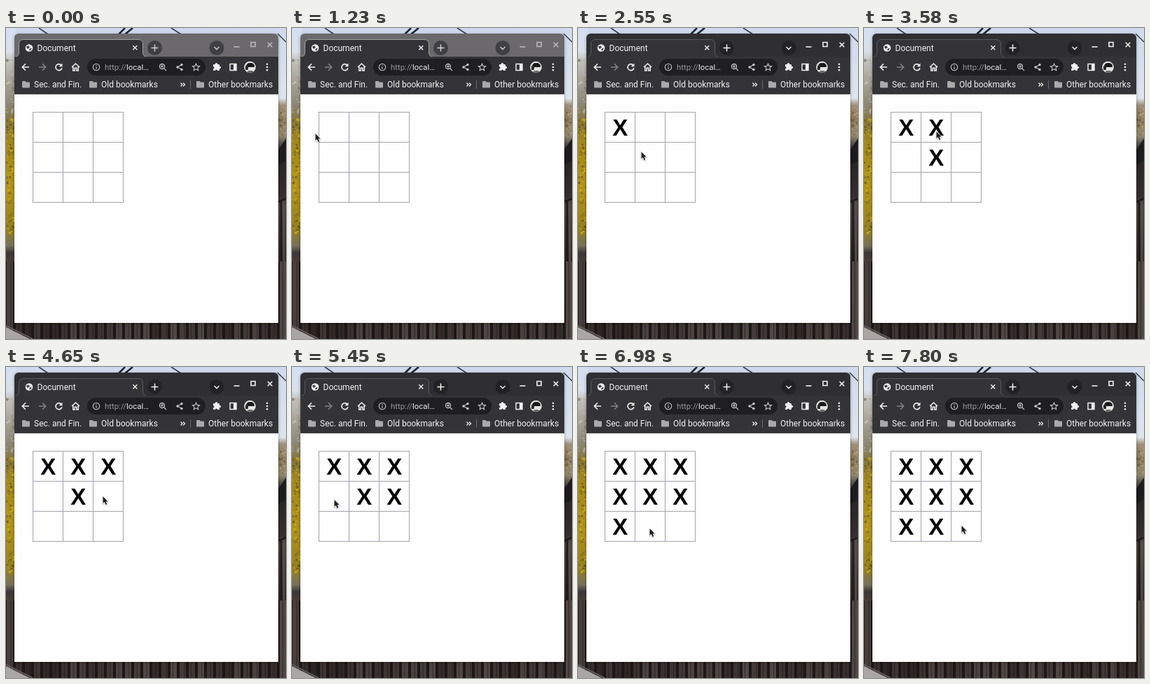
Animation, 400 px wide and 445 px high, one loop 8000 ms. Source, as an HTML page with a canvas:

```html
<!DOCTYPE html>
<html lang="en">
<head>
<meta charset="utf-8">
<title>Document</title>
<style>
html, body { margin: 0; width: 100%; height: 100%; overflow: hidden; }
canvas { display: block; width: 400px; height: 445px; }
</style>
</head>
<body>
<canvas id="stage" width="400" height="445"></canvas>
<script>
const W = 400, H = 445, LOOP = 8000;
const stage = document.getElementById('stage').getContext('2d');
const UI = 'Roboto, "Noto Sans", sans-serif';
let c;

function rect(x, y, w, h, color) {
  c.fillStyle = color;
  c.fillRect(x, y, w, h);
}
function rounded(x, y, w, h, r, color) {
  c.fillStyle = color;
  c.beginPath();
  c.roundRect(x, y, w, h, r);
  c.fill();
}
function disc(x, y, r, color) {
  c.fillStyle = color;
  c.beginPath();
  c.arc(x, y, r, 0, Math.PI * 2);
  c.fill();
}
function ring(x, y, r, color, width = 1.2) {
  c.beginPath();
  c.arc(x, y, r, 0, Math.PI * 2);
  c.strokeStyle = color;
  c.lineWidth = width;
  c.stroke();
}
// SVG path data, placed at x, y
function draw(path, x, y, color, width) {
  const p = new Path2D(path);
  c.save();
  c.translate(x, y);
  c.lineWidth = width || 1;
  c.strokeStyle = c.fillStyle = color;
  width ? c.stroke(p) : c.fill(p);
  c.restore();
}
function text(s, x, y, size, color) {
  c.font = `${size}px ${UI}`;
  c.fillStyle = color;
  c.fillText(s, x, y);
}
function fade(x, y, w, h, stops) {
  const g = c.createLinearGradient(0, y, 0, y + h);
  stops.forEach(([at, color]) => g.addColorStop(at, color));
  rect(x, y, w, h, g);
}
function random(seed) {
  return () => (seed = (seed * 16807) % 2147483647) / 2147483647;
}

function backdrop() {
  const rnd = random(77);
  const leaves = (x, y, w, h, n, colors) => {
    for (let i = 0; i < n; i++) {
      disc(x + rnd() * w, y + rnd() * h, .7 + rnd() * 1.3, colors[i % colors.length]);
    }
  };
  fade(0, 0, W, 12, [[0, '#cbd7ee'], [1, '#d6dff0']]);
  fade(0, 0, 14, 335, [[0, '#d3dff2'], [.1, '#dbe1ea'], [.14, '#c3c1bd'], [.22, '#aaa59a'],
    [.32, '#8d8877'], [.4, '#84763a'], [.5, '#a58a1a'], [.7, '#b0921a'], [.86, '#94801f'],
    [.93, '#77705c'], [.96, '#3c3838'], [1, '#4a3c35']]);
  leaves(0, 45, 13, 90, 40, ['#c2beb3', '#8b8679', '#a8a192']);
  leaves(0, 130, 13, 165, 110, ['#c9a81d', '#6f5d1c', '#b69a20', '#8a7420']);
  fade(386, 0, 14, 335, [[0, '#cfdaee'], [.3, '#dfe5ef'], [.33, '#9f8f79'], [.39, '#8b795a'],
    [.46, '#93896f'], [.5, '#4e4a47'], [.53, '#262325'], [.6, '#2b2727'], [.72, '#352f2e'],
    [.76, '#4b4340'], [1, '#2f2827']]);
  leaves(389, 110, 11, 45, 22, ['#b59c66', '#6f624b', '#a69a7c']);
  draw('M388 176L400 158V190L388 196Z', 0, 0, '#1d1b1d');
  draw('M388 249L400 244M393 248V335', 0, 0, '#191618', 2);
  draw('M397 248V335', 0, 0, '#5b514c', 2);
  draw('M47 0L60 9M236 0L250 9', 0, 0, '#343b48', 1.6);
  draw('M161 9L170 0M170 9L181 0', 0, 0, '#1f242d', 2.6);
  draw('M388 8L400 20', 0, 0, '#343b48', 1.4);

  // fence
  rect(0, 334, W, 111, '#1c1818');
  for (let x = 0; x < W; x += 13) {
    const tone = 42 + rnd() * 34;
    fade(x + 1, 334, 9, 111, [[0, `rgb(${tone + 8},${tone - 4},${tone - 8})`],
      [1, `rgb(${tone + 5},${tone - 3},${tone - 6})`]]);
    rect(x + 4 + rnd() * 4, 334, 1, 111, 'rgba(15,12,12,.45)');
  }
  draw('M0 428L34 445H0Z', 0, 0, '#aaa6a3');
  draw('M0 426L38 445', 0, 0, '#5f5a58', 2);
}

function frameBar(active) {
  const ink = active ? '#f3f3f3' : '#b9b8ba';
  const strip = active ? '#2f2e32' : '#6b696c';
  const button = active ? '#232226' : '#403f42';
  const sign = active ? '#f3f3f3' : '#d2d2d2';
  c.save();
  c.shadowColor = 'rgba(0,0,0,.35)';
  c.shadowBlur = 4;
  c.shadowOffsetY = 1;
  rounded(12, 8, 377, 414, [6, 6, 0, 0], strip);
  c.restore();

  c.beginPath();
  c.moveTo(12, 41.5);
  c.quadraticCurveTo(18.5, 41, 18.5, 35);
  c.lineTo(18.5, 23);
  c.quadraticCurveTo(18.5, 16.5, 25, 16.5);
  c.lineTo(189, 16.5);
  c.quadraticCurveTo(195.5, 16.5, 195.5, 23);
  c.lineTo(195.5, 35);
  c.quadraticCurveTo(195.5, 41, 202, 41.5);
  c.fillStyle = '#343337';
  c.fill();
  c.strokeStyle = active ? '#5b5a5f' : '#a09fa2';
  c.lineWidth = 1;
  c.stroke();

  disc(33, 28.5, 5.3, '#f2f2f2');
  draw('M-4-2L-1-3L1-1L-1 1L-3 1ZM1 1L4 0L2 4L0 3Z', 33, 28.5, '#434247');
  text('Document', 44.5, 32.5, 12, '#f1f1f1');
  draw('M-3-3L3 3M3-3L-3 3', 184.3, 28.3, '#f0f0f0', 1.4);

  disc(212.5, 28.5, 10.5, button);
  draw('M-5 0H5M0-5V5', 212.5, 28.5, sign, 1.5);
  disc(301, 28.5, 10.5, button);
  draw('M-3.5-1.5L0 2L3.5-1.5', 301, 28.5, sign, 1.4);
  draw('M-4 0H4', 329.5, 27, ink, 1.6);
  draw('M-3-3H3V3H-3Z', 353, 23.5, ink, 1.6);
  draw('M-3.3-3.3L3.3 3.3M3.3-3.3L-3.3 3.3', 377, 24, ink, 1.6);
}

function folder(x) {
  draw('M0 1Q0 0 1 0H4.5L6 1.5H10Q11 1.5 11 2.5V8.5Q11 9.5 10 9.5H1Q0 9.5 0 8.5Z', x, 76, '#aaa9ac');
}

function toolbar() {
  const ink = '#f2f2f2', soft = '#c9c8cb';
  rect(12, 41, 377, 54, '#343337');
  rect(12, 94, 377, 1, '#4b4a4e');
  draw('M5 0H-4.5M0-4.7L-4.7 0L0 4.7', 28, 56, ink, 1.6);
  draw('M-5 0H4.5M0-4.7L4.7 0L0 4.7', 52, 56, '#828185', 1.6);
  draw('M3.6-2.6A4.5 4.5 0 1 0 4.4 1.2', 75.5, 56, ink, 1.6);
  draw('M5-5.5V-.7H.2Z', 75.5, 56, ink);
  draw('M-5.5 0L0-5L5.5 0M-3.7-1V5H-1.3V1.3H1.3V5H3.7V-1', 99.5, 56, ink, 1.5);

  rounded(116, 44, 169, 24, 12, '#1f1e22');
  ring(129, 56, 4.7, soft, 1.1);
  draw('M0-2.8V-1.5M0-.5V2.8', 129, 56, soft, 1.2);
  text('http://', 141, 60, 11.4, '#98979b');
  const start = 141 + c.measureText('http://').width;
  text('local…', start, 60, 11.4, '#ececec');
  ring(223, 55, 3.5, soft, 1.3);
  draw('M2.6 2.6L6 6M-2 0H2M0-2V2', 223, 55, soft, 1.2);
  draw('M3-3.5L-3 0L3 3.5', 248, 56, soft, 1.1);
  [[251, 52.5], [245, 56], [251, 59.5]].forEach(([x, y]) => disc(x, y, 1.7, soft));
  draw('M0-5L1.5-1.6L5.1-1.3L2.4 1.1L3.2 4.7L0 2.8L-3.2 4.7L-2.4 1.1L-5.1-1.3L-1.5-1.6Z', 271.5, 56, soft, 1.1);

  rounded(296, 52, 9, 9, 1, ink);
  disc(300.5, 51.8, 1.8, ink);
  disc(305.3, 56.5, 1.8, ink);
  disc(296, 56.7, 1.5, '#343337');
  disc(300.5, 61, 1.5, '#343337');
  draw('M-4.5-4.5H4.5V4.5H-4.5Z', 324.5, 56, ink, 1.4);
  rect(325, 51.5, 4, 9, ink);

  // avatar
  c.save();
  c.beginPath();
  c.arc(348.5, 56, 8.3, 0, Math.PI * 2);
  c.clip();
  rect(340, 47, 17, 18, '#e4e4e1');
  rounded(343, 50, 12, 6, [5, 5, 1, 1], '#19191b');
  rounded(342, 54, 4, 6, 1, '#2b2b2d');
  rounded(345, 61, 8, 5, 2, '#6a6c6c');
  c.restore();
  [-4.2, 0, 4.2].forEach(dy => disc(373, 56 + dy, 1.3, ink));

  folder(23);
  text('Sec. and Fin.', 40, 85, 12, ink);
  folder(119);
  text('Old bookmarks', 136, 85, 12, ink);
  draw('M-3-2.5L-.5 0L-3 2.5M.5-2.5L3 0L.5 2.5', 252.5, 81, ink, 1.3);
  rect(263, 75, 1, 12, '#69686c');
  folder(272);
  text('Other bookmarks', 289, 85, 12, ink);
}

function page() {
  rect(12, 95, 377, 327, '#fefefe');
  for (let i = 0; i < 4; i++) {
    rect(38 + i * 43, 120, 1, 130, '#a3a3ac');
    rect(38, 120 + i * 43, 130, 1, '#a3a3ac');
  }
}

function scene(active) {
  const layer = document.createElement('canvas');
  layer.width = W;
  layer.height = H;
  c = layer.getContext('2d');
  backdrop();
  frameBar(active);
  toolbar();
  page();
  return layer;
}

const idle = scene(false), focused = scene(true);
c = stage;

// [time, cell]
const clicks = [[1640, 0], [2820, 4], [3480, 1], [4180, 2], [4900, 5], [5560, 3], [6520, 6], [7260, 7]];
// [time, x, y]
const path = [[850, -10, 300], [1230, 33, 151], [1580, 58, 139], [1850, 58, 139], [2550, 90, 177],
  [2780, 101, 184], [3050, 101, 184], [3400, 103, 148], [3700, 103, 148], [4080, 145, 146],
  [4300, 145, 146], [4650, 138, 185], [5050, 140, 187], [5480, 59, 190], [5880, 59, 190],
  [6380, 73, 233], [6700, 66, 232], [6980, 102, 231], [7360, 102, 231], [7700, 139, 227], [8000, 139, 227]];

function pointer(t) {
  const i = path.findIndex(k => k[0] > t);
  if (i < 1) return;
  const [t0, x0, y0] = path[i - 1], [t1, x1, y1] = path[i];
  const p = (t - t0) / (t1 - t0), e = p * p * (3 - 2 * p);
  const x = x0 + (x1 - x0) * e, y = y0 + (y1 - y0) * e;
  const arrow = 'M.5 .3V10L2.7 8L4.5 12L6.2 11.2L4.5 7.4H7.6Z';
  c.save();
  c.shadowColor = 'rgba(0,0,0,.3)';
  c.shadowBlur = 2;
  c.shadowOffsetY = 1;
  draw(arrow, x, y, '#f4f4f4', 1.3);
  c.restore();
  draw(arrow, x, y, '#1c1c1c');
}

function render(t) {
  c.drawImage(t < clicks[0][0] ? idle : focused, 0, 0);
  c.font = 'bold 33px "Liberation Sans", Arial, sans-serif';
  c.textAlign = 'center';
  c.fillStyle = '#000';
  for (const [at, cell] of clicks) {
    if (t >= at) c.fillText('X', 60.3 + cell % 3 * 43, 154 + Math.floor(cell / 3) * 43);
  }
  pointer(t);
}

const began = performance.now();
function tick() {
  render((performance.now() - began) % LOOP);
  requestAnimationFrame(tick);
}
tick();
</script>
</body>
</html>
```
